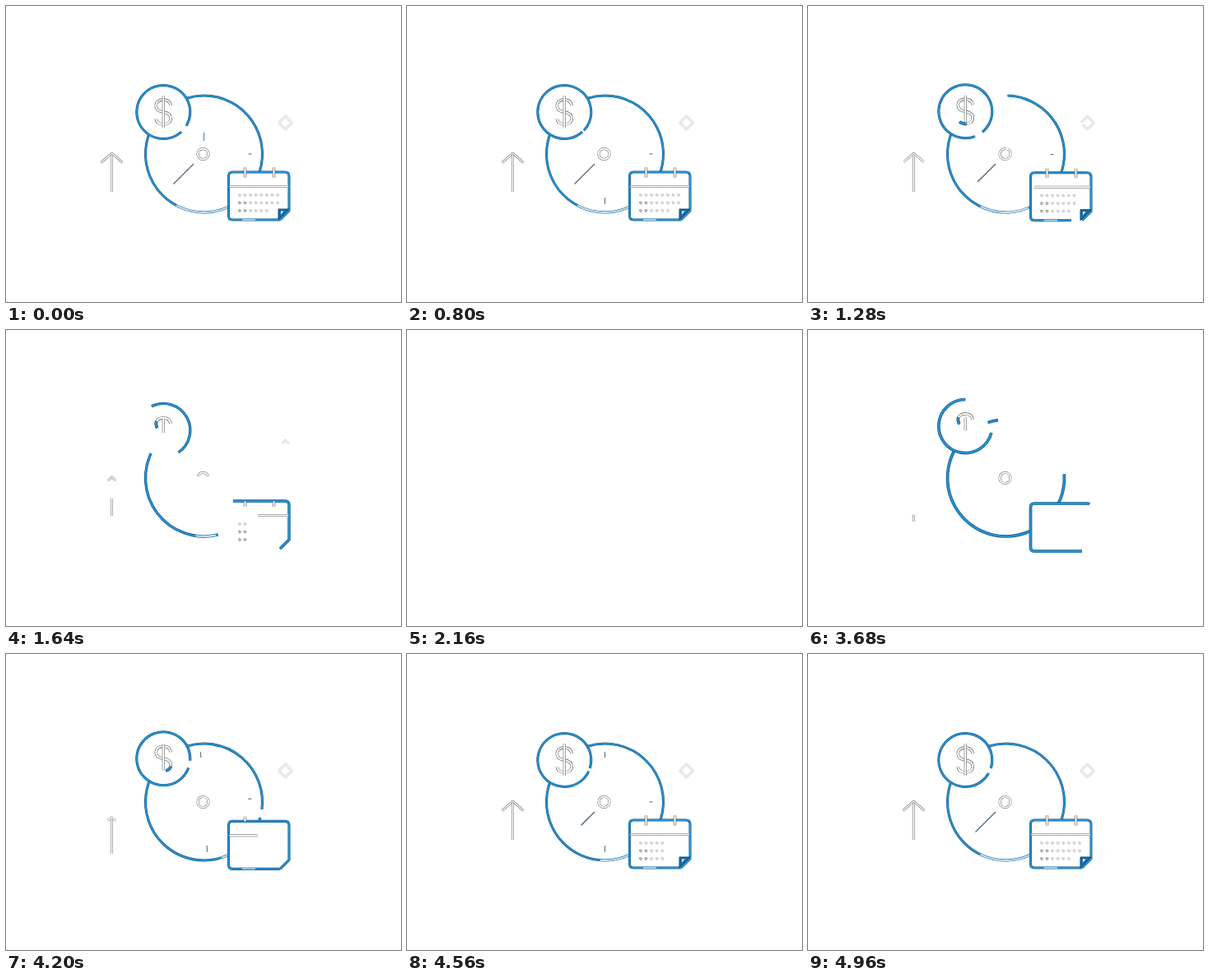
Animation, 480 px wide and 360 px high, one loop 5000 ms. Source, as an HTML page:

```html
<!DOCTYPE html>
<html lang="en">
<head>
<meta charset="utf-8">
<title>Time and money</title>
<style>
html, body { margin: 0; width: 100%; height: 100%; overflow: hidden; background: #fff; }
svg { display: block; width: 480px; height: 360px; }
</style>
</head>
<body>
<svg id="stage" viewBox="0 0 480 360" fill="none" stroke-linejoin="round"></svg>
<script>
const LOOP = 5000;
const BLUE = ['#0b5588', '#2990cd'];
const GREY = ['#5c5c5c', '#fff'];
const CORE = 0.66;
const stage = document.getElementById('stage');

const clamp = x => Math.min(1, Math.max(0, x));
const mix = (a, b, k) => a + (b - a) * k;
const phase = (t, from, to) => clamp((t - from) / (to - from));
const smooth = (t, from, to) => {
  const k = phase(t, from, to);
  return k * k * (3 - 2 * k);
};

function set(node, attrs) {
  for (const key in attrs) node.setAttribute(key, attrs[key]);
}
function add(parent, tag, attrs = {}) {
  const node = document.createElementNS('http://www.w3.org/2000/svg', tag);
  set(node, attrs);
  parent.append(node);
  return node;
}
function show(node, on) {
  node.setAttribute('visibility', on ? 'visible' : 'hidden');
}

// A line with a dark rim and a lighter core.
function line(parent, colors, width, d = '') {
  return colors.map((stroke, i) => add(parent, 'path', {
    d, stroke, pathLength: 100, 'stroke-width': i ? width * CORE : width
  }));
}
function shape(pair, d) {
  pair.forEach(p => p.setAttribute('d', d));
}
function trim(pair, from, to) {
  pair.forEach(p => {
    show(p, to - from > 0.2);
    set(p, { 'stroke-dasharray': `${Math.max(0, to - from)} 999`, 'stroke-dashoffset': -from });
  });
}
function weight(pair, w) {
  pair.forEach((p, i) => set(p, { 'stroke-width': i ? w * CORE : w }));
}
function arc(cx, cy, r, from, to) {
  const span = Math.min(to - from, 359.9);
  if (span < 0.3) return '';
  const point = deg => {
    const a = deg * Math.PI / 180;
    return `${cx + r * Math.cos(a)},${cy + r * Math.sin(a)}`;
  };
  return `M${point(from)}A${r},${r} 0 ${span > 180 ? 1 : 0} 1 ${point(from + span)}`;
}
const dialArc = (from, to) => arc(240.5, 180, 71, from, to);

// Clock
const art = add(stage, 'g');
const dial = line(art, BLUE, 3);
const sheen = add(art, 'path', { stroke: '#fff', 'stroke-width': 2, opacity: 0.75 });
const hub = line(art, GREY, 2.8);
const ticks = add(art, 'g', { stroke: '#5f7f98', 'stroke-width': 1.2 });
const [topTick, sideTick, lowTick] =
  ['M240.5 119v7', 'M294.5 180h4', 'M240.5 233v8'].map(d => add(ticks, 'path', { d }));
const minute = add(art, 'path', { d: 'M240.5 154v10', stroke: '#4f8fbd', 'stroke-width': 1.2 });
const hour = add(art, 'path', { d: 'M228 192L203.5 216.5', stroke: '#5c7186', 'stroke-width': 1.5, pathLength: 100 });

// Coin
const S = 'M9-8C8-13 4-15 0-15C-6-15-9-12-9-8C-9-2-5-1 0 0C6 1 9 3 9 8C9 12 5 15 0 15C-5 15-9 12-9 8';
const coin = add(art, 'g');
add(coin, 'circle', { r: 32, fill: '#fff' });
const rim = line(coin, BLUE, 3);
const curve = line(coin, GREY, 3.4, S);
const stem = line(coin, GREY, 3.2);
const curveTip = line(coin, BLUE, 3.6, S);
const dialHead = line(art, BLUE, 3);

// Calendar
const cal = add(art, 'g');
add(cal, 'path', { d: 'M271 203H343V249L332 259H271Z', fill: '#fff' });
const frame = line(cal, BLUE, 3,
  'M333 260H275Q270.5 260 270.5 255V207Q270.5 202 275 202H339Q344 202 344 207V249L333 260');
const bar = line(cal, GREY, 3, 'M271.5 219.5H343');
const rings = [290.5, 325.5].map(x => line(cal, ['#446', '#fffbe8'], 3.4, `M${x} 196.5V208.5`));
const fold = add(cal, 'g');
add(fold, 'path', { d: 'M331 247H344L331 260Z', fill: '#176ea6', stroke: '#0c4a78' });
add(fold, 'path', { d: 'M334 249.5h3.5l-3.5 4z', fill: '#fff' });
const shine = add(cal, 'path', { d: 'M287 260h16', stroke: '#fff', 'stroke-width': 1.6, opacity: 0.7 });
const days = [];
for (let row = 0; row < 3; row++) {
  for (let col = 0; col < (row < 2 ? 8 : 6); col++) {
    const x = 284 + 6.6 * col;
    const node = add(cal, 'rect', {
      x: x - 1.2, y: 228.8 + 9.5 * row, width: 2.4, height: 2.4, 'stroke-width': 0.8,
      stroke: row && col < 2 ? '#444' : '#999', 'stroke-dasharray': '1.6 1'
    });
    days.push({ node, x });
  }
}

// Arrow, diamond, specks
const shaft = line(art, GREY, 3);
const head = line(art, GREY, 2.4);
const diamond = line(art, ['#999', '#fff'], 1.8, 'M331.5 142L339.5 134L347.5 142L339.5 150Z');
const specks = add(stage, 'g', { fill: '#777' });
[[198, 102], [191.5, 110], [223, 116], [291.5, 130.5]].forEach(([cx, cy], i) =>
  add(specks, 'circle', { cx, cy, r: 1.4 - 0.15 * i }));

function drawClock(t, entering, out, away) {
  if (entering) {
    shape(dial, dialArc(mix(204, -4, smooth(t, 3060, 3680)) + 21 * smooth(t, 3700, 4300), 210));
    shape(dialHead, dialArc(-108, mix(-108, 17.2, phase(t, 3630, 4250))));
    shape(hub, arc(239.5, 180, 6.5, -50, mix(-50, 310, phase(t, 3060, 3600))));
    set(sheen, { d: dialArc(66, mix(66, 116, phase(t, 4100, 4900))) });
  } else {
    shape(dial, dialArc(mix(-108, 270, out), 210));
    shape(dialHead, '');
    shape(hub, arc(239.5, 180, 6.5, -90 + 598 * out, 270 + 144 * out));
    set(sheen, { d: dialArc(66 + 25 * out, 118 - 41 * out) });
  }
  weight(dial, 3 + 0.7 * away);
  weight(dialHead, 3 + 0.7 * away);

  set(ticks, { transform: `rotate(${entering ? -28 * away : 12 * out} 240.5 180)` });
  const landing = t > 4100 && t < 4750;
  show(topTick, landing);
  show(sideTick, landing || t < 1300);
  show(lowTick, landing || (t > 500 && t < 1250));
  show(minute, t < 420);
  trim([hour], 0, 100 * (entering ? phase(t, 4280, 4700) : clamp(1 - 2.06 * out)));
}

function drawCoin(t, entering, out, away) {
  const y = entering ? -12.8 * away : -14.4 * out;
  set(coin, { transform: `translate(191.3 ${129 + y})` });
  const from = entering
    ? mix(270, 14, smooth(t, 3060, 3680)) + 16 * phase(t, 3680, 5000)
    : mix(48, 450, out);
  const to = entering ? mix(270, 378, smooth(t, 3680, 4350)) : mix(391, 416, phase(t, 0, 1640));
  shape(rim, arc(0, 0, 32.5, from, to));
  weight(rim, 3 + 0.7 * away);

  const drawn = entering ? phase(t, 3160, 4460) : clamp(1 - 1.24 * out);
  trim(curve, 0, 100 * drawn);
  trim(curveTip, Math.max(0, 100 * drawn - 11), drawn < 1 ? 100 * drawn : 0);
  const top = entering ? mix(-4, -20, drawn) : mix(-20, -8, out);
  const foot = entering ? mix(-4, 19, drawn) : mix(19, -14, out);
  shape(stem, foot - top > 0.3 ? `M0 ${top}V${foot}` : '');
}

function drawCalendar(t, entering, out, away) {
  set(cal, { transform: `translate(0 ${entering ? 9.6 * away : 12.4 * out})` });
  const gone = 100 * out;
  trim(frame, gone, entering ? 100 * phase(t, 3080, 3880) : 100);
  weight(frame, 3 + 0.7 * away);
  trim(bar, gone, entering ? 100 * phase(t, 3980, 4440) : 100);
  rings.forEach((ring, i) =>
    trim(ring, gone, entering ? 100 * phase(t - 120 * i, 4080, 4330) : 100));
  show(fold, t < 1380 || t > 4420);
  show(shine, t < 1300 || t > 4150);
  const edge = entering ? mix(280, 332, phase(t, 4280, 4750)) : 332 - 75 * out;
  days.forEach(d => show(d.node, d.x <= edge));
}

function drawExtras(t, entering, out) {
  const foot = 226 + (entering ? 18.8 * Math.sin(Math.PI * phase(t, 3560, 4560)) : 0);
  const top = entering ? foot - 46 * phase(t, 3560, 4240) : Math.min(foot, mix(180, 231, out));
  shape(shaft, foot - top > 0.3 ? `M128.5 ${top}V${foot}` : '');
  const wing = entering ? phase(t, 4110, 4370) : clamp(1 - 1.32 * out);
  const y = entering ? top - 1 : 179;
  const dx = 13 * wing, dy = y + 11.5 * wing;
  shape(head, wing ? `M${128.5 - dx} ${dy}L128.5 ${y}L${128.5 + dx} ${dy}` : '');
  trim(diamond, 25 * out, entering ? 100 * phase(t, 3720, 4180) : 100 - 125 * out);
}

function render(t) {
  const idle = t >= 2280 && t < 3080;
  show(specks, idle);
  art.style.display = idle ? 'none' : '';
  if (idle) return;
  const entering = t > 2500;
  const out = entering ? 0 : smooth(t, 1140, 2160);
  const away = entering ? 1 - smooth(t, 3550, 4400) : out;
  drawClock(t, entering, out, away);
  drawCoin(t, entering, out, away);
  drawCalendar(t, entering, out, away);
  drawExtras(t, entering, out);
}

const start = performance.now();
function tick() {
  render((performance.now() - start) % LOOP);
  requestAnimationFrame(tick);
}
tick();
</script>
</body>
</html>
```
